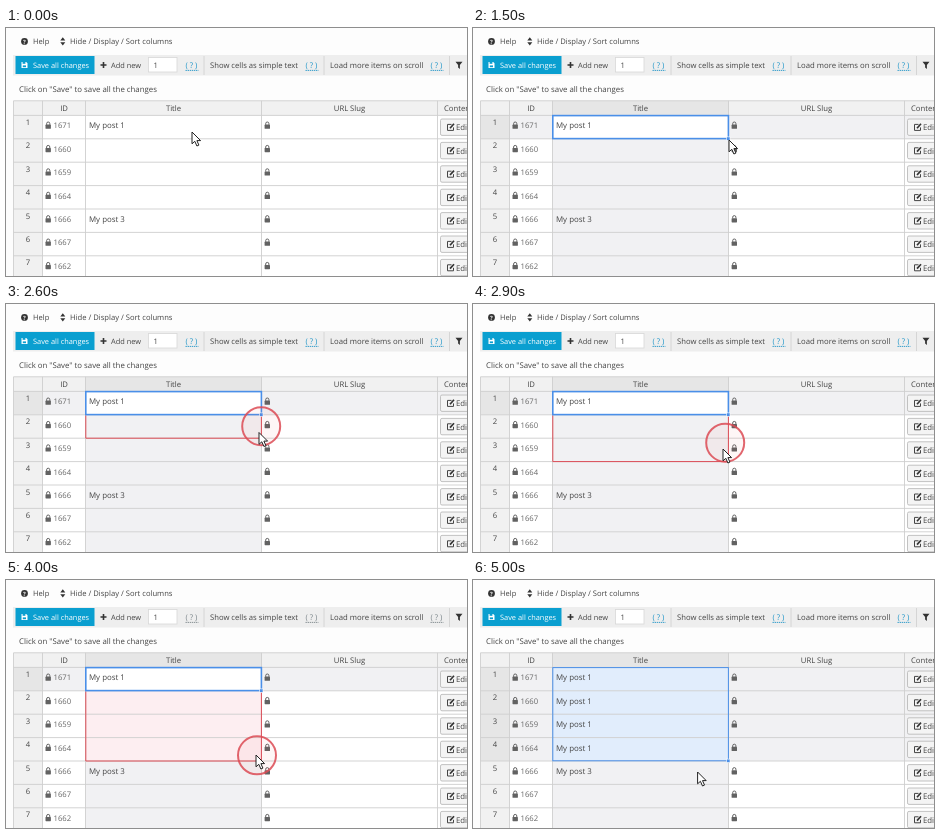
These frames come from a looping animation (461x248 px, 5100 ms). An HTML page:

```html
<!DOCTYPE html>
<html lang="en">
<head>
<meta charset="utf-8">
<title>Spreadsheet drag fill</title>
<style>
  html, body { margin: 0; width: 100%; height: 100%; overflow: hidden; background: #fdfdfd; }
  svg { display: block; width: 461px; height: 248px; }
  text { font-family: "Open Sans", "Noto Sans", sans-serif; fill: #444; text-rendering: geometricPrecision; white-space: pre; }
</style>
</head>
<body>
<svg id="stage" viewBox="0 0 461 248"></svg>
<script>
const NS = 'http://www.w3.org/2000/svg';
const LOOP = 5100, STEP = 100;
const stage = document.getElementById('stage');
const cols = [7.5, 36.5, 79.5, 255.5, 431.5, 470];
const ids = [1671, 1660, 1659, 1664, 1666, 1667, 1662];
const rowY = r => 87.4 + 23.4 * r;
const GREY = '#f1f1f3', BLUE = '#4a8fe8', RED = '#dc4c55';

function el(name, attrs, parent = stage) {
  const node = document.createElementNS(NS, name);
  set(node, attrs);
  parent.appendChild(node);
  return node;
}
function set(node, attrs) {
  for (const key in attrs) node.setAttribute(key, attrs[key]);
}
const show = (node, on) => set(node, { visibility: on ? 'visible' : 'hidden' });
const rect = (x, y, width, height, fill, more) => el('rect', { x, y, width, height, fill, ...more });
const path = (d, more) => el('path', { d, fill: 'none', ...more });
function text(x, y, str, size = 7.8, more = {}) {
  const node = el('text', { x, y, 'font-size': size, ...more });
  node.textContent = str;
  return node;
}

function lock(x, y) {
  rect(x, y + 3, 5.4, 4.2, '#626262', { rx: 0.6 });
  path(`M${x + 1.1} ${y + 3.2}v-1.2a1.6 1.6 0 0 1 3.2 0v1.2`, { stroke: '#626262', 'stroke-width': 1 });
}

function helpMark(x) {
  const label = text(x, 40, '(?)', 7.8, { 'letter-spacing': 1.9 });
  const line = path(`M${x} 42.4h13`, { 'stroke-width': 0.9, 'stroke-dasharray': '1.4 .7' });
  return { label, line };
}

function editButton(y) {
  rect(434.5, y + 3.6, 40, 16.4, '#f4f4f4', { rx: 1.5, stroke: '#bcbcbc', 'stroke-width': 0.9 });
  path(`M445.5 ${y + 9}h-4v6h6v-3`, { stroke: '#444', 'stroke-width': 1 });
  path(`M444 ${y + 12.8}l4-4.4`, { stroke: '#333', 'stroke-width': 1.7 });
  text(450, y + 15, 'Edit');
}

// Top menu
el('circle', { cx: 18.5, cy: 13.4, r: 3.4, fill: '#333' });
text(18.5, 15.5, '?', 5.8, { 'text-anchor': 'middle', 'font-weight': 700, style: 'fill:#fff' });
text(27, 16.2, 'Help', 7.5);
path('M54.3 12.4l2.5-3.2 2.5 3.2zM54.3 14.2l2.5 3.2 2.5-3.2z', { fill: '#333' });
text(64, 16.2, 'Hide / Display / Sort columns', 7.62);

// Toolbar
rect(7, 27, 454, 20.5, '#eeeeee');
rect(9.5, 28, 79, 18, '#0a9fd0');
path('M15.5 34h4.7l1.3 1.3v4.7h-6z', { fill: '#fff' });
rect(16.6, 34, 2.8, 1.8, '#0a9fd0');
rect(16.8, 37.4, 3.2, 1.8, '#0a9fd0');
text(27, 39.8, 'Save all changes', 7.4, { style: 'fill:#fff' });
path('M94.5 37h6M97.5 34v6', { stroke: '#333', 'stroke-width': 1.6 });
text(105, 39.8, 'Add new', 7.4);
rect(142.5, 29.5, 28.5, 14.5, '#fff', { stroke: '#d8d8d8', 'stroke-width': 0.8 });
text(147.5, 39.8, '1', 7.6);
for (const x of [198, 318, 443.5]) path(`M${x} 28v19`, { stroke: '#d2d2d2', 'stroke-width': 0.9 });
text(204, 39.8, 'Show cells as simple text', 7.68);
text(324, 39.8, 'Load more items on scroll', 7.76);
const marks = [179.5, 299.5, 424.5].map(helpMark);
path('M449.5 33.8h7l-2.6 3.1v4.1l-1.8-1.4v-2.7z', { fill: '#333' });
text(13, 64.2, 'Click on "Save" to save all the changes', 7.83);

// Table backgrounds
rect(7.5, 72.8, 454, 176, '#fff');
rect(7.5, 72.8, 454, 14.6, '#f1f1f1');
const titleHead = rect(79.5, 72.8, 176, 14.6, '#e6e6e6');
const rows = ids.map((_, r) => ({
  head: rect(7.5, rowY(r), 29, 23.4, '#f1f1f1'),
  body: rect(36.5, rowY(r), 430, 23.4, '#fff'),
  title: rect(79.5, rowY(r), 176, 23.4, '#fff')
}));

// Grid
const grid = { stroke: '#cfcfcf', 'stroke-width': 0.9 };
path('M7.5 72.8H461', grid);
ids.forEach((_, r) => path(`M7.5 ${rowY(r)}H461`, grid));
cols.forEach(x => path(`M${x} 72.8V248`, grid));

['ID', 'Title', 'URL Slug'].forEach((name, i) =>
  text((cols[i + 1] + cols[i + 2]) / 2, 83, name, 7.7, { 'text-anchor': 'middle' }));
text(438, 83, 'Content', 7.7);

ids.forEach((id, r) => {
  const y = rowY(r);
  text(22, y + 9.6, r + 1, 7.7, { 'text-anchor': 'middle' });
  lock(39.5, y + 6.2);
  text(47.5, y + 13, id, 7.7, { style: 'fill:#666' });
  lock(258.6, y + 6.2);
  editButton(y);
  rows[r].label = text(83, y + 13, r === 4 ? 'My post 3' : 'My post 1', 7.9);
});

// Selection, fill outline, pointer
const fillBox = path('', { stroke: RED, 'stroke-width': 1 });
const selection = rect(79.8, 87.6, 175.6, 23, 'none', { stroke: BLUE });
const knob = rect(253.6, 0, 3.4, 3.4, BLUE, { stroke: '#fff', 'stroke-width': 0.6 });
const ring = el('circle', { fill: RED, 'fill-opacity': 0.05, stroke: RED, 'stroke-opacity': 0.85, 'stroke-width': 2 });
const pointer = path('M0 0V11.8L2.8 9.3 4.9 14 6.9 13.1 4.9 8.6H8.6Z',
  { fill: '#fff', stroke: '#222', 'stroke-width': 1, 'stroke-linejoin': 'round' });

// time, x, y
const track = [
  [0, 186, 104], [100, 185.6, 104], [200, 185.6, 104], [300, 210, 107], [500, 255.5, 111],
  [600, 255.5, 111], [900, 238, 111], [1000, 238, 111], [1200, 248.5, 111], [1500, 256, 112],
  [2300, 256, 112], [2900, 250, 145], [3280, 250, 174], [3500, 250, 175],
  [4300, 250, 175], [4800, 247, 178.5], [4900, 247, 178.5], [5000, 224.6, 192]
];
function pointerAt(t) {
  const i = track.findIndex(key => key[0] > t);
  if (i < 0) return track[track.length - 1].slice(1);
  const [t0, x0, y0] = track[i - 1], [t1, x1, y1] = track[i];
  const k = (t - t0) / (t1 - t0);
  return [x0 + (x1 - x0) * k, y0 + (y1 - y0) * k];
}

function render(t) {
  const selected = t >= 300, filled = t >= 4400;
  const dragging = t >= 2400 && !filled;
  const flushed = t >= 4000 && !filled;
  const [x, y] = pointerAt(t);
  const last = filled ? 3 : 0;

  show(titleHead, selected);
  rows.forEach((row, r) => {
    const active = selected && r <= last;
    set(row.head, { fill: active ? '#e6e6e6' : '#f1f1f1' });
    set(row.body, { fill: active ? GREY : '#fff' });
    let fill = selected ? GREY : '#fff';
    if (active) fill = filled ? '#e1edfc' : '#fff';
    else if (flushed && r < 4) fill = '#fdeef1';
    set(row.title, { fill });
    show(row.label, r === 0 || r === 4 || (filled && r < 4));
  });

  show(selection, selected);
  set(selection, { height: rowY(last + 1) - 87.8, 'stroke-width': filled ? 1 : 1.6 });
  show(knob, selected);
  set(knob, { y: rowY(last + 1) - 1.9 });

  const dropRow = Math.floor((y - 87.4) / 23.4);
  show(fillBox, dragging && dropRow > 0);
  set(fillBox, { d: `M79.8 111.4V${rowY(dropRow + 1)}H255.4V111.4` });

  const [rx, ry] = pointerAt(Math.max(0, t - 120));
  show(ring, t >= 1900 && !filled);
  set(ring, { cx: rx + 1, cy: ry + 0.3, r: Math.min(19, 7 + (t - 1900) * 0.06) > 0 ? Math.min(19, 7 + (t - 1900) * 0.06) : 0 });
  set(pointer, { transform: `translate(${x} ${y})` });

  const tint = flushed ? '#7d878c' : '#2196c8';
  marks.forEach(({ label, line }) => {
    label.style.fill = tint;
    set(line, { stroke: tint });
  });
}

const start = performance.now();
function tick() {
  const t = (performance.now() - start) % LOOP;
  render(Math.floor(t / STEP) * STEP);
  requestAnimationFrame(tick);
}
tick();
</script>
</body>
</html>
```
